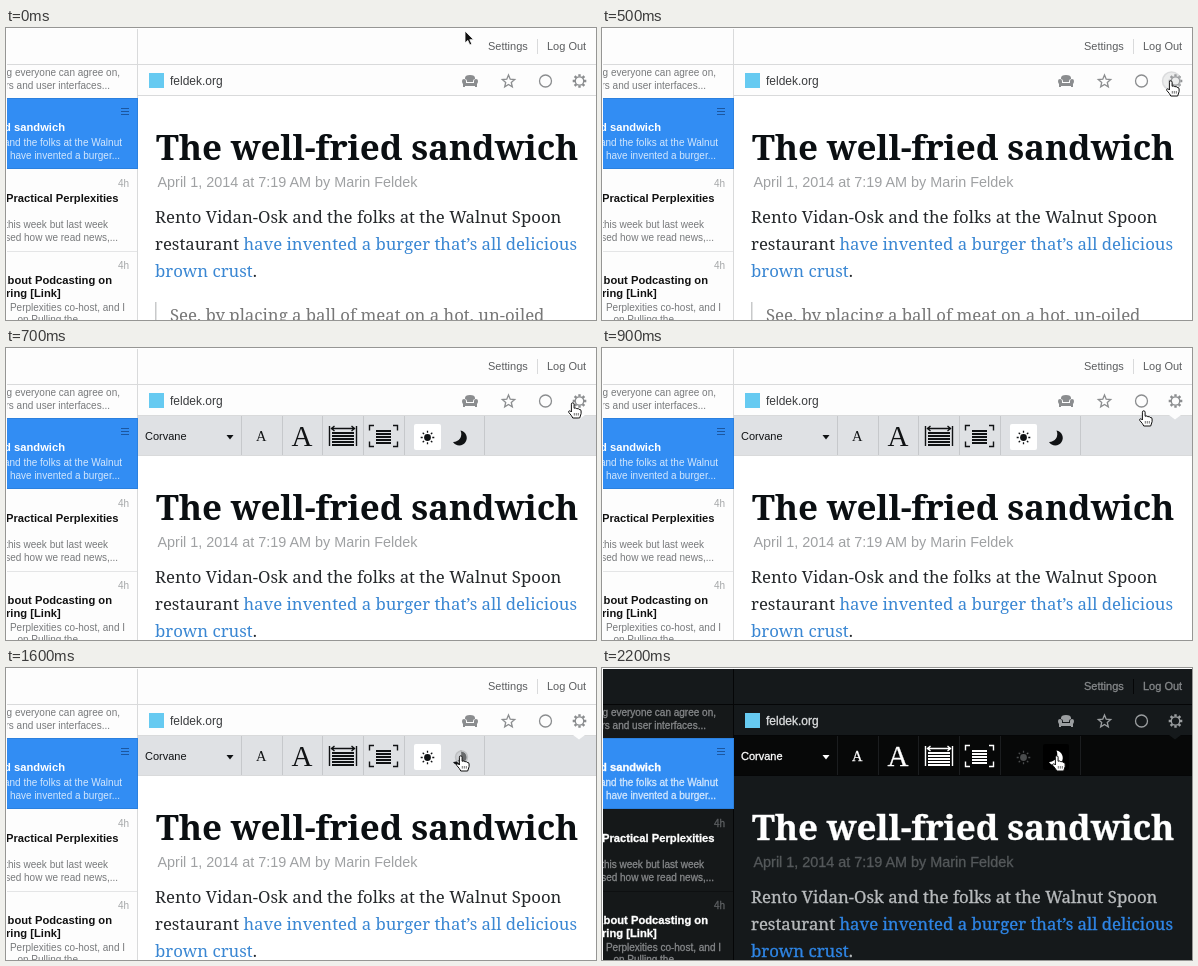
Animation of 590 by 292 pixels, one loop 2.4 s. Source, as an HTML page:

```html
<!DOCTYPE html>
<html lang="en">
<head>
<meta charset="utf-8">
<title>Reader night mode</title>
<style>
html, body { margin: 0; width: 100%; height: 100%; overflow: hidden; background: #fff; }
svg { display: block; width: 590px; height: 292px; font-family: "Liberation Sans", Arial, sans-serif; }
#stage {
  --page: #fff; --side: #fdfdfd; --head: #fdfdfd; --rule: #d9dadb; --row: #e4e5e6;
  --title: #0b0f12; --date: #9fa1a3; --body: #25282b; --link: #3a87d3; --quote: #777;
  --strong: #111; --soft: #77797b; --time: #a5a7a9; --menu: #5b5d5f; --site: #3a3c3e;
  --icon: #8b8d8f; --bar: #dfe1e4; --split: #c6c8cb; --tool: #101214; --chip: #fff;
  --sun: #101214; --ring: #bfc1c3;
}
#stage.dark {
  --page: #15191b; --side: #151819; --head: #15191b; --rule: #050607; --row: #0e1011;
  --title: #fff; --date: #55595b; --body: #b9bcbe; --link: #2f86e6; --quote: #888;
  --strong: #fff; --soft: #858789; --time: #5c5f61; --menu: #85888a; --site: #dcdedf;
  --icon: #9b9ea0; --bar: #070808; --split: #1b1d1f; --tool: #fff; --chip: #000;
  --sun: #4a4c4d; --ring: #f0f0f0;
}
text, tspan { fill: var(--ink); }
/* light text on dark is rendered heavier */
.dark text, .dark tspan { stroke: var(--ink); stroke-width: .3px; }
.serif { --ink: var(--body); font-family: "Noto Serif", serif; font-size: 16.76px; }
.link { --ink: var(--link); }
.title { --ink: var(--title); font-size: 35px; font-weight: 700; letter-spacing: -.15px; }
.date { --ink: var(--date); font-size: 14.4px; }
.quote { --ink: var(--quote); }
.menu { --ink: var(--menu); font-size: 11px; }
.site { --ink: var(--site); font-size: 12px; }
.bold { --ink: var(--strong); font-size: 11.2px; font-weight: 700; }
.soft { --ink: var(--soft); font-size: 10px; }
.time { --ink: var(--time); font-size: 10px; }
.picked .bold { --ink: #fff; }
.picked .soft { --ink: #d3e7fd; }
.font { --ink: var(--tool); font-size: 11px; }
.letter { --ink: var(--tool); font-family: "Liberation Serif", Times, serif; font-size: 14.5px; }
.big { font-size: 29px; }
.line { fill: none; stroke: var(--icon); stroke-width: 1.3; }
.ink { fill: none; stroke: var(--tool); stroke-width: 1.4; }
.rows { stroke-width: 2; }
.end { text-anchor: end; }
</style>
</head>
<body>
<svg id="stage" viewBox="0 0 590 292"></svg>
<script>
const stage = document.getElementById('stage');

const rect = (x, y, w, h, fill, extra = '') =>
  `<rect x="${x}" y="${y}" width="${w}" height="${h}" fill="${fill}" ${extra}/>`;
const text = (x, y, cls, str) => `<text x="${x}" y="${y}" class="${cls}">${str}</text>`;
const path = (d, cls, extra = '') => `<path d="${d}" class="${cls}" ${extra}/>`;
const solid = (d, fill) => path(d, '', `fill="${fill}"`);
const rows = (x, w, ys) => ys.map(y => `M${x} ${y}h${w}`).join('');
const polar = (cx, cy, r, a) =>
  `${(cx + r * Math.sin(a)).toFixed(2)} ${(cy - r * Math.cos(a)).toFixed(2)}`;

function star(cx, cy, r) {
  const pts = Array.from({ length: 10 }, (_, i) => polar(cx, cy, i % 2 ? r * .45 : r, i * Math.PI / 5));
  return `M${pts.join('L')}Z`;
}

function spokes(cx, cy, from, to) {
  return Array.from({ length: 8 }, (_, i) => {
    const a = i * Math.PI / 4;
    return `M${polar(cx, cy, from, a)}L${polar(cx, cy, to, a)}`;
  }).join('');
}

const sidebar = [
  rect(0, 37, 131, 255, 'var(--side)'),
  rect(131, 0, 1, 292, 'var(--rule)'),
  text(114, 47.5, 'soft end', 'g everyone can agree on,'),
  text(104, 60.5, 'soft end', 'rs and user interfaces...'),
  '<g class="picked">',
  rect(-1, 70.5, 132.5, 70, '#328df3', 'stroke="#2b80de"'),
  path(rows(115, 8, [80.5, 83.5, 86.5]), '', 'stroke="#1c57a0"'),
  text(59, 103, 'bold end', 'well-fried sandwich'),
  text(116, 117.5, 'soft end', 'and the folks at the Walnut'),
  text(114, 130.5, 'soft end', 'have invented a burger...'),
  '</g>',
  text(123, 158.5, 'time end', '4h'),
  text(0, 173.5, 'bold', 'Practical Perplexities'),
  text(102, 200, 'soft end', 'this week but last week'),
  text(112, 213, 'soft end', 'used how we read news,...'),
  rect(0, 223, 131, 1, 'var(--row)'),
  text(123, 241, 'time end', '4h'),
  text(106, 256, 'bold end', 'About Podcasting on'),
  text(0, 269, 'bold', 'ring [Link]'),
  text(119, 283, 'soft end', 'al Perplexities co-host, and I'),
  text(72, 295, 'soft end', 'on Pulling the'),
].join('');

const article = [
  text(150, 132, 'serif title', 'The well-fried sandwich'),
  text(151.5, 158.5, 'date', 'April 1, 2014 at 7:19 AM by Marin Feldek'),
  text(149, 195, 'serif', 'Rento Vidan-Osk and the folks at the Walnut Spoon'),
  text(149, 222, 'serif', 'restaurant <tspan class="link">have invented a burger that’s all delicious</tspan>'),
  text(149, 249, 'serif', '<tspan class="link">brown crust</tspan>.'),
  rect(149, 274, 1.5, 60, '#c8c9ca'),
  text(164, 293, 'serif quote', 'See, by placing a ball of meat on a hot, un-oiled'),
].join('');

const header = [
  rect(0, 0, 590, 36, 'var(--head)'),
  rect(132, 37, 458, 30, 'var(--head)'),
  rect(0, 36, 590, 1, 'var(--rule)'),
  rect(131, 0, 1, 36, 'var(--rule)'),
  rect(132, 67, 458, 1, 'var(--rule)'),
  text(482, 22, 'menu', 'Settings'),
  rect(531, 11, 1, 15, 'var(--rule)'),
  text(541, 22, 'menu', 'Log Out'),
  rect(143, 45, 15, 15, '#66caf1'),
  text(164, 57, 'site', 'feldek.org'),
  // armchair
  solid('M459 51v-1q0-3 5-3t5 3v1q-2 0-2 3h-6q0-3-2-3z', 'var(--icon)'),
  solid('M456 53q0-2 2-2t2 2v2h8v-2q0-2 2-2t2 2q0 2-1 3v3h-2v-1h-10v1h-2v-3q-1-1-1-3z', 'var(--icon)'),
  path(star(502.5, 53.5, 6.5), 'line'),
  '<circle cx="539.5" cy="53" r="6" class="line"/>',
  '<circle cx="573.5" cy="53" r="4.2" class="line"/>',
  path(spokes(573.5, 53, 4.4, 6.8), 'line', 'style="stroke-width:2.4"'),
].join('');

const toolbar = [
  rect(132, 68, 458, 39, 'var(--bar)'),
  rect(132, 107, 458, 1, 'var(--rule)'),
  ...[235, 276, 316, 357, 398, 478].map(x => rect(x, 68, 1, 39, 'var(--split)')),
  solid('M567 67l6 4.5l6-4.5z', 'var(--head)'),
  text(139, 91.5, 'font', 'Corvane'),
  solid('M220.5 87h7l-3.5 4.5z', 'var(--tool)'),
  text(250, 93, 'letter', 'A'),
  text(285.5, 98, 'letter big', 'A'),
  // column width
  path('M323.5 78v20M350.5 78v20', 'ink'),
  path('M325 80.5h24M328.5 78l-3 2.5l3 2.5M345.5 78l3 2.5l-3 2.5', 'ink'),
  path(rows(326, 22, [85, 88, 91, 94, 97]), 'ink rows'),
  // full screen
  path('M368 77.5h-4.5v5M387 77.5h4.5v5M368 98.5h-4.5v-5M387 98.5h4.5v-5', 'ink'),
  path(rows(370, 15, [83, 86, 89, 92, 95]), 'ink rows'),
  '<rect id="chip" y="76" height="26" rx="2" fill="var(--chip)"/>',
  '<circle cx="421.5" cy="89.5" r="3.4" fill="var(--sun)"/>',
  path(spokes(421.5, 89.5, 4.8, 6.8), '', 'stroke="var(--sun)" stroke-width="1.3"'),
  solid('M454.5 82.5a7.5 7.5 0 1 1-7.5 11.5a8 8 0 0 0 7.5-11.5z', 'var(--tool)'),
].join('');

// Pointer art is drawn with its tip at 0,0.
const arrow = path('M0 0v12l2.8-2.6l2 4.6l2-.9l-2-4.4h3.8z', '',
  'fill="#111" stroke="#fff" stroke-width=".8"');
const hand = path('M-1.6 1.2q0-1.4 1.3-1.4t1.4 1.4v4q2.2-.7 2.7.5q1.8-.5 2.3.7q2-.2 2 1.6v2.6l-1.4 4.4h-6.9q-1-2.4-4-5.5q-.6-1.6.8-1.7q.9 0 1.8 1.2z',
  '', 'fill="#fff" stroke="#111" stroke-linejoin="round"') +
  path('M1.3 10v2.6M3.3 10v2.6M5.3 10v2.6', '', 'stroke="#333" stroke-width=".7"');

stage.innerHTML =
  rect(0, 0, 590, 292, 'var(--page)') +
  `<g id="article">${article}</g>` + sidebar + header +
  `<g id="toolbar">${toolbar}</g>` +
  '<circle id="ring" fill="var(--ring)" stroke="var(--ring)" stroke-width="1.5" fill-opacity=".5"/>' +
  `<g id="arrow">${arrow}</g><g id="hand">${hand}</g>` +
  rect(0, 0, 1, 292, '#fff') + rect(0, 0, 590, 1, '#fff');

const part = Object.fromEntries(['article', 'toolbar', 'chip', 'ring', 'arrow', 'hand']
  .map(id => [id, document.getElementById(id)]));

// time, x, y of the pointer tip
const route = [
  [0, 459, 3], [100, 468, 8], [200, 498, 23], [300, 538, 41], [400, 563, 51], [500, 569, 53],
  [600, 570, 54], [700, 567, 55], [800, 558, 58], [900, 542, 63], [1000, 508, 73],
  [1100, 474, 83], [1200, 458, 87.5], [1300, 455, 88], [2400, 455, 88],
];

function along(t) {
  const i = Math.max(1, route.findIndex(p => p[0] > t));
  const [t0, x0, y0] = route[i - 1], [t1, x1, y1] = route[i];
  const k = (t - t0) / (t1 - t0);
  return [x0 + (x1 - x0) * k, y0 + (y1 - y0) * k];
}

const show = (el, on) => el.setAttribute('visibility', on ? 'visible' : 'hidden');
const place = (el, x, y) => el.setAttribute('transform', `translate(${x} ${y})`);

function draw(t) {
  const open = t >= 600, dark = t >= 1700;
  const [x, y] = along(t);
  stage.classList.toggle('dark', dark);
  place(part.article, 0, open ? (t < 700 ? 39 : 40) : 0);
  place(part.toolbar, 0, t < 700 ? -1 : 0);
  show(part.toolbar, open);

  const left = t < 1700 ? 408 : t < 1800 ? 428 : t < 1900 ? 437 : 441;
  const right = t < 1700 ? 435 : t < 1800 ? 464 : 467;
  part.chip.setAttribute('x', left);
  part.chip.setAttribute('width', right - left);

  const onGear = t >= 500 && t < 700, onMoon = t >= 1600 && t < 1800;
  show(part.ring, onGear || onMoon);
  place(part.ring, x + .5, y + (onGear ? 0 : 1));
  part.ring.setAttribute('r', onGear ? 9 : 6);
  part.ring.setAttribute('opacity', t < 600 ? .55 : 1);

  const pointing = t >= 400;
  show(part.arrow, !pointing);
  show(part.hand, pointing);
  place(part.arrow, x, y);
  place(part.hand, x, y);
}

const start = performance.now();
function tick() {
  const t = (performance.now() - start) % 2400;
  draw(Math.floor(t / 100) * 100);
  requestAnimationFrame(tick);
}
tick();
</script>
</body>
</html>
```
